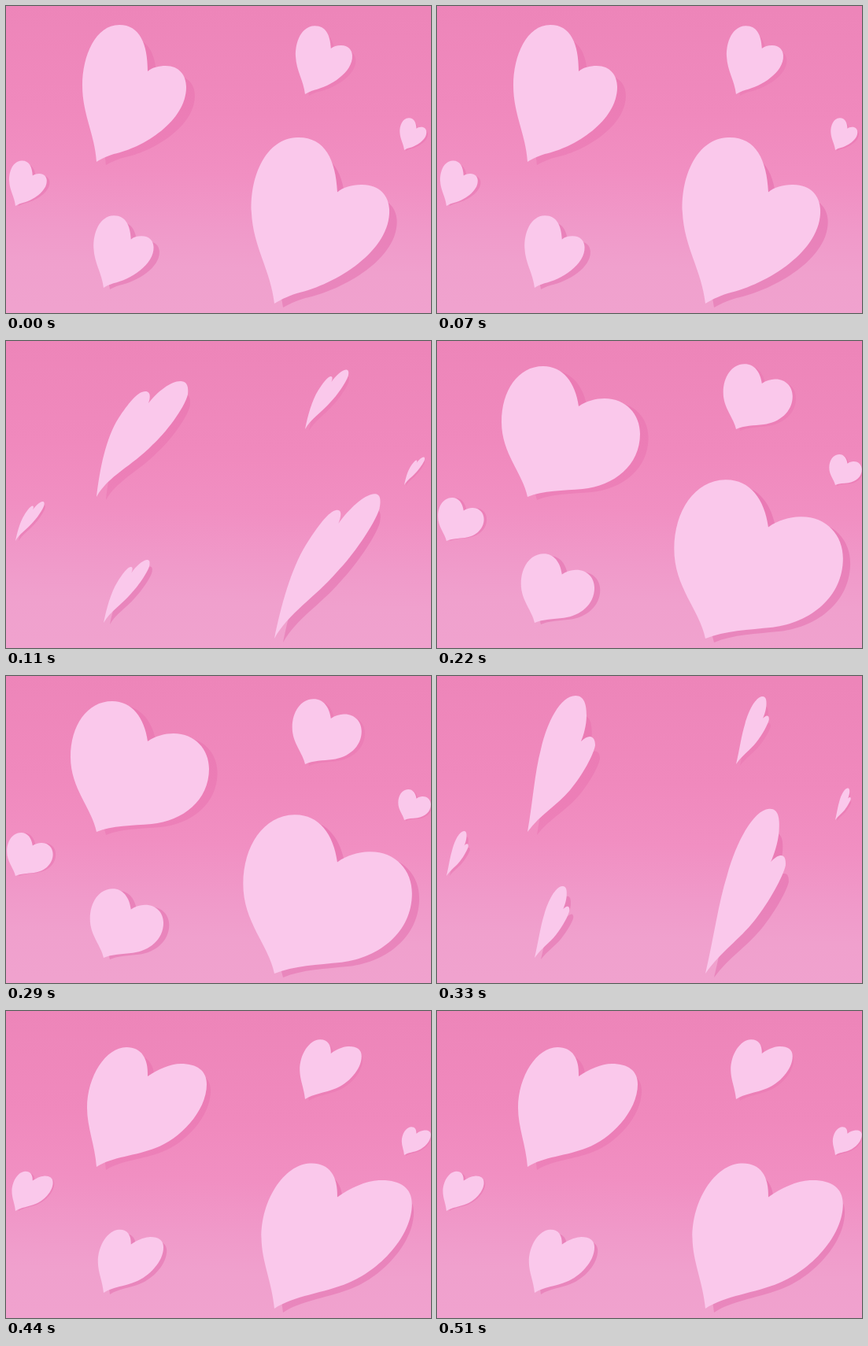
Animation of 540x390 px, one loop 0.55 s. Source, as an HTML page with a canvas:

```html
<!DOCTYPE html>
<html lang="en">
<head>
<meta charset="utf-8">
<title>Spinning hearts</title>
<style>
  html, body { margin: 0; width: 100%; height: 100%; overflow: hidden; }
  canvas { display: block; }
</style>
</head>
<body>
<canvas id="stage" width="540" height="390"></canvas>
<script>
const ctx = document.getElementById('stage').getContext('2d');
const POSE_MS = 110;
const NORMAL = [0.87, 0.49]; // across the axis from tip to notch

// Each pose is drawn around the heart's tip at 0,0.
// shadow: width and height of the cast shape.
// turn: how far points beside the axis move in hearts that spin a little ahead.
const poses = [
  { shadow: [0.99, 0.93], turn: [0.09, -0.04],
    d: 'M0 0C-2-35-18-60-18-97C-18-135-1-174 29-174C55-174 65-150 65-115C71-120 79-122 88-122C105-122 114-110 114-95C114-52 60-18 22-10C12-7 5-3 0 0Z' },
  { shadow: [0.92, 0.92], turn: [-0.2, -0.11],
    d: 'M0 0C4-35 12-75 28-100C40-118 52-134 62-134C70-134 68-124 66-119C78-134 94-147 107-147C116-147 117-138 116-130C112-113 87-80 71-66C45-39 15-27 0 0Z' },
  { shadow: [0.99, 0.99], turn: [-0.01, -0.03],
    d: 'M0 0C-6-30-33-55-33-95C-33-135-12-166 20-166C45-166 61-145 65-115C75-122 87-125 98-125C125-125 143-105 143-80C143-40 110-14 70-10C45-8 20-8 0 0Z' },
  { shadow: [0.93, 0.88], turn: [-0.15, -0.09],
    d: 'M0 0C7-40 9-75 17-105C25-140 42-173 61-173C72-173 75-162 75-148C75-135 71-122 68-115C72-119 76-121 79-121C84-121 86-116 86-110C84-98 70-72 54-53C37-33 17-23 0 0Z' },
  { shadow: [0.95, 0.96], turn: [0.03, -0.05],
    d: 'M0 0C-2-28-12-50-12-75C-12-115 12-152 38-152C57-152 66-138 65-115C78-124 94-131 107-131C128-131 140-122 140-105C140-70 105-35 75-24C50-14 20-13 0 0Z' }
].map(pose => ({ ...pose, path: new Path2D(pose.d) }));

// Tip position, scale, shadow offset and strength; ahead: 1 if the pose's turn applies.
const hearts = [
  { x: 115, y: 198, scale: 1, dx: 12, dy: 4, alpha: 0.25, ahead: 0 },
  { x: 380, y: 112, scale: 0.505, dx: 5, dy: 2, alpha: 0.2, ahead: 1 },
  { x: 506, y: 183, scale: 0.238, dx: 2, dy: 1, alpha: 0.25, ahead: 1 },
  { x: 12, y: 254, scale: 0.335, dx: 4, dy: 0, alpha: 0.3, ahead: 1 },
  { x: 124, y: 358, scale: 0.535, dx: 8, dy: 2, alpha: 0.38, ahead: 1 },
  { x: 341, y: 378, scale: 1.23, dx: 11, dy: 5, alpha: 0.38, ahead: 1 }
];

const sky = ctx.createLinearGradient(276, 0, 264, 390);
[[0, '#ed85b9'], [0.35, '#f089bd'], [0.55, '#f18fc2'], [0.72, '#f099c9'], [0.85, '#f0a0cd'], [1, '#f0a2ce']]
  .forEach(([stop, color]) => sky.addColorStop(stop, color));

function fillHeart({ path, turn }, x, y, sx, sy, ahead, color) {
  const [nx, ny] = NORMAL;
  const [tx, ty] = turn.map(amount => amount * ahead);
  ctx.save();
  ctx.translate(x, y);
  ctx.scale(sx, sy);
  ctx.transform(1 + nx * tx, nx * ty, ny * tx, 1 + ny * ty, 0, 0);
  ctx.fillStyle = color;
  ctx.fill(path);
  ctx.restore();
}

function draw() {
  const pose = poses[Math.floor(performance.now() / POSE_MS) % poses.length];
  const [shadowX, shadowY] = pose.shadow;
  ctx.fillStyle = sky;
  ctx.fillRect(0, 0, 540, 390);
  for (const { x, y, scale, dx, dy, alpha, ahead } of hearts) {
    fillHeart(pose, x + dx, y + dy, scale * shadowX, scale * shadowY, ahead, `rgba(222, 90, 160, ${alpha})`);
    fillHeart(pose, x, y, scale, scale, ahead, '#fac8eb');
  }
  requestAnimationFrame(draw);
}
draw();
</script>
</body>
</html>
```
